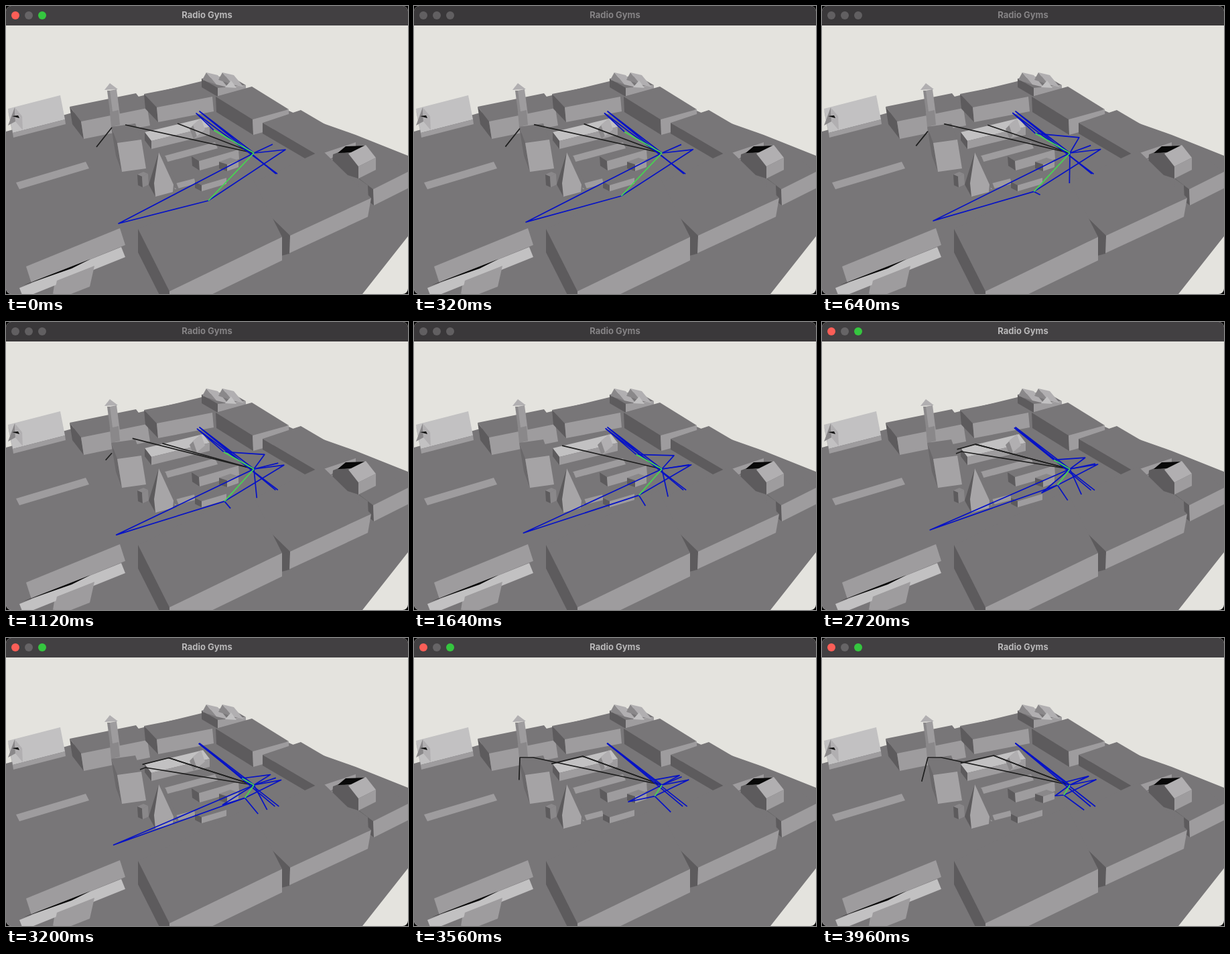
Recreate the animation shown at these times as an HTML page. Size 600 px wide and 429 px high, loop 4 s.

```html
<!DOCTYPE html>
<html>
<head>
<meta charset="utf-8">
<style>
html, body { margin: 0; width: 100%; height: 100%; overflow: hidden; background: #000; }
svg { display: block; width: 100vw; height: 100vh; }
#rays { fill: none; stroke-width: 1.7; stroke-linejoin: round; }
text { font: 700 13px Inter, Roboto, sans-serif; text-anchor: middle; }
</style>
</head>
<body>
<svg viewBox="0 0 600 429">
  <defs><clipPath id="window"><rect width="600" height="429" rx="8"/></clipPath></defs>
  <g clip-path="url(#window)">
    <rect width="600" height="429" fill="#e4e3de"/>
    <g id="scene"></g>
    <g id="rays"></g>
    <rect id="bar" width="600" height="29"/>
    <g id="buttons"></g>
    <text id="title" x="300" y="18">Radio Gyms</text>
  </g>
</svg>
<script>
const LOOP = 4000, STEP = 40;
const $ = id => document.getElementById(id);
const make = (parent, tag, attrs) => {
  const el = document.createElementNS('http://www.w3.org/2000/svg', tag);
  for (const key in attrs) el.setAttribute(key, attrs[key]);
  return $(parent).appendChild(el);
};

// Solids: each is built from a few corners, the rest follows from parallel edges
const flat = '#787678', front = '#9e9c9e', side = '#5d5b5d', mid = '#8a888a',
  pale = '#b1afb1', bright = '#c2c1c2', black = '#080808';
const plus = (a, b) => [a[0] + b[0], a[1] + b[1]];
const minus = (a, b) => [a[0] - b[0], a[1] - b[1]];
const face = (fill, ...points) => make('scene', 'polygon', { fill, points: points.join(' ') });
const quad = (fill, a, b, c) => face(fill, a, b, c, plus(a, minus(c, b)));

function box(left, near, right, drop, [top, dark, light] = [flat, side, front]) {
  quad(top, left, near, right);
  quad(dark, plus(left, drop), left, near);
  quad(light, plus(near, drop), near, right);
}

function gable(apex, left, right, along, wall, roof) {
  face(wall, apex, left, right);
  quad(roof, right, apex, plus(apex, along));
}

// Ground
face(flat, [0, 187], [95, 160], [292, 112], [357, 122], [422, 156], [431, 160],
  [522, 192], [600, 223], [600, 343], [532, 429], [0, 429]);

// Far left house
box([3, 153], [10, 189], [88, 169], [1, 7], [bright, mid, front]);
gable([13, 151], [3, 178], [14, 172], [11, 13], mid, pale);
face(black, [9, 164], [18, 163], [20, 167]);

// Back rows
box([95, 150], [112, 172], [211, 152], [4, 26]);
box([206, 131], [225, 151], [308, 135], [2, 22]);
box([292, 108], [316, 122], [358, 118], [0, 13]);
for (const x of [0, 24]) gable([299 + x, 99], [293 + x, 110], [314 + x, 117], [17, 4], mid, pale);
face(bright, [327, 121], [336, 111], [344, 122]);
box([313, 135], [368, 169], [422, 154], [1, 23]);
box([383, 174], [465, 222], [522, 203], [0, 16]);
quad(flat, [466, 238], [487, 226], [523, 209]);

// Right house and the block beside it
box([527, 257], [548, 273], [600, 247], [1, 24]);
quad(flat, [526, 257], [527, 279], [541, 289]);
face(side, [488, 221], [496, 218], [512, 219], [526, 239], [526, 257], [486, 244]);
quad(black, [495, 219], [507, 209], [537, 208]);
quad(pale, [511, 220], [526, 239], [552, 226]);
quad(front, [526, 257], [526, 239], [552, 226]);

// Tower with its base
quad(mid, [158, 180], [151, 126], [157, 126]);
quad(front, [162, 180], [155, 126], [165, 124]);
face(pale, [147, 125], [155, 115], [167, 124]);
quad(mid, [157, 180], [155, 158], [168, 155]);
box([157, 180], [166, 204], [202, 199], [7, 43], [flat, '#6a686a', '#a5a3a5']);

// Long hall with a dormer
box([207, 188], [217, 201], [304, 180], [0, 12], [bright, side, front]);
quad(mid, [274, 183], [280, 177], [286, 192]);
quad(pale, [285, 194], [279, 177], [291, 167]);

// Courtyard
quad(front, [234, 234], [230, 225], [312, 203]);
box([277, 224], [288, 231], [347, 214], [1, 14]);
box([318, 232], [330, 236], [347, 230], [0, 10], [mid, side, front]);
quad(front, [252, 273], [250, 265], [281, 257]);
box([282, 262], [292, 267], [329, 256], [0, 9]);
box([196, 251], [203, 254], [212, 250], [1, 16], [mid, side, mid]);
gable([228, 218], [213, 266], [223, 284], [0, 0], side, side);
quad(flat, [249, 269], [228, 218], [238, 224]);
face('#a7a5a7', [228, 218], [250, 266], [249, 277], [223, 284], [221, 264]);

// Foreground blocks
box([351, 271], [424, 342], [545, 286], [-5, 28]);
quad(side, [411, 372], [412, 345], [424, 342]);
box([197, 332], [244, 425], [412, 344], [0, 35]);

// Left slabs
quad(front, [20, 273], [15, 263], [119, 232]);
quad(front, [38, 413], [30, 388], [170, 331]);
quad(front, [70, 429], [74, 403], [130, 381]);
quad(bright, [26, 435], [20, 420], [172, 359]);
quad(front, [69, 440], [76, 409], [132, 387]);
face(black, [26, 416], [126, 377], [98, 391]);

// Rays: points glide, ease or swing with the loop
const smooth = u => 1 - (1 - u) ** 1.6;
const swing = u => (1 - Math.cos(2 * Math.PI * u)) / 2;
const fixed = (...p) => () => p;
const glide = (a, b, ease = u => u, from = 0, to = LOOP) => t => {
  const k = ease(Math.min(1, Math.max(0, (t - from) / (to - from))));
  return a.map((v, i) => +(v + (b[i] - v) * k).toFixed(1));
};

const hub = fixed(370, 219);
const fanEnd = glide([405, 250], [408, 251]);
const low = glide([302, 290], [361, 234], smooth);
const high = glide([310, 185], [363, 215]);
const far = glide([168, 324], [160, 307], smooth);
const near = glide([333, 261], [320, 244], undefined, 2200, 3560);
const nearBack = glide([320, 244], [348, 235], undefined, 3560, 3960);
const hall = glide([256, 175], [218, 185], swing);
const hallEnd = glide([197, 193], [207, 186], undefined, 1660);
const tower = glide([178, 177], [196, 171], swing);
const corner = glide([158, 181], [158, 205], swing);

const rays = [];
const ray = (stroke, points, from = 0, to = LOOP) =>
  rays.push({ el: make('rays', 'polyline', { stroke }), points, from, to });
const blue = '#0612c6', dark = '#1e1e1e', green = '#45d950';

ray(dark, [hub, hall]);
ray(dark, [hub, hall, hallEnd], 1660);
ray(dark, [hub, tower], 0, 1500);
ray(dark, [corner, glide([135, 210], [158, 203], swing)], 0, 1500);
ray(dark, [hub, fixed(208, 193), fixed(200, 196)], 2320, 3420);
ray(dark, [hub, fixed(178, 178), fixed(158, 178), glide([162, 210], [148, 214], undefined, 3300)], 3420);
ray(blue, [low, far, hub], 0, 3400);
ray(blue, [low, glide([417, 214], [409, 211]), hub]);
ray(blue, [high, glide([284, 160], [289, 157]), fanEnd]);
ray(blue, [hub, fixed(289, 157), glide([403, 250], [401, 251])]);
ray(blue, [hub, glide([398, 206], [412, 213], swing)]);
ray(blue, [high, glide([381, 194], [398, 206]), hub], 440);
ray(blue, [hub, glide([362, 267], [392, 255], smooth)], 440, 3400);
ray(blue, [low, glide([313, 286], [392, 256])], 440);
ray(blue, [low, near, hub], 2480, 3560);
ray(blue, [low, nearBack, hub], 3560);
ray(green, [hub, low]);
ray(green, [hub, high], 0, 3400);

const buttons = [14, 34, 54].map(cx => make('buttons', 'circle', { cx, cy: 14, r: 6 }));

function draw(now) {
  const t = Math.floor(now % LOOP / STEP) * STEP;
  for (const { el, points, from, to } of rays) {
    el.style.display = t >= from && t < to ? '' : 'none';
    el.setAttribute('points', points.map(p => p(t)).join(' '));
  }
  const active = t < 320 || t >= 2520;
  $('bar').setAttribute('fill', active ? '#424042' : '#3a383a');
  $('title').setAttribute('fill', active ? '#b9b8b9' : '#858385');
  const colors = active ? ['#fb5e57', '#666466', '#35c63f'] : Array(3).fill('#615f61');
  buttons.forEach((b, i) => b.setAttribute('fill', colors[i]));
}

const start = performance.now();
function tick() {
  draw(performance.now() - start);
  requestAnimationFrame(tick);
}
tick();
</script>
</body>
</html>
```
